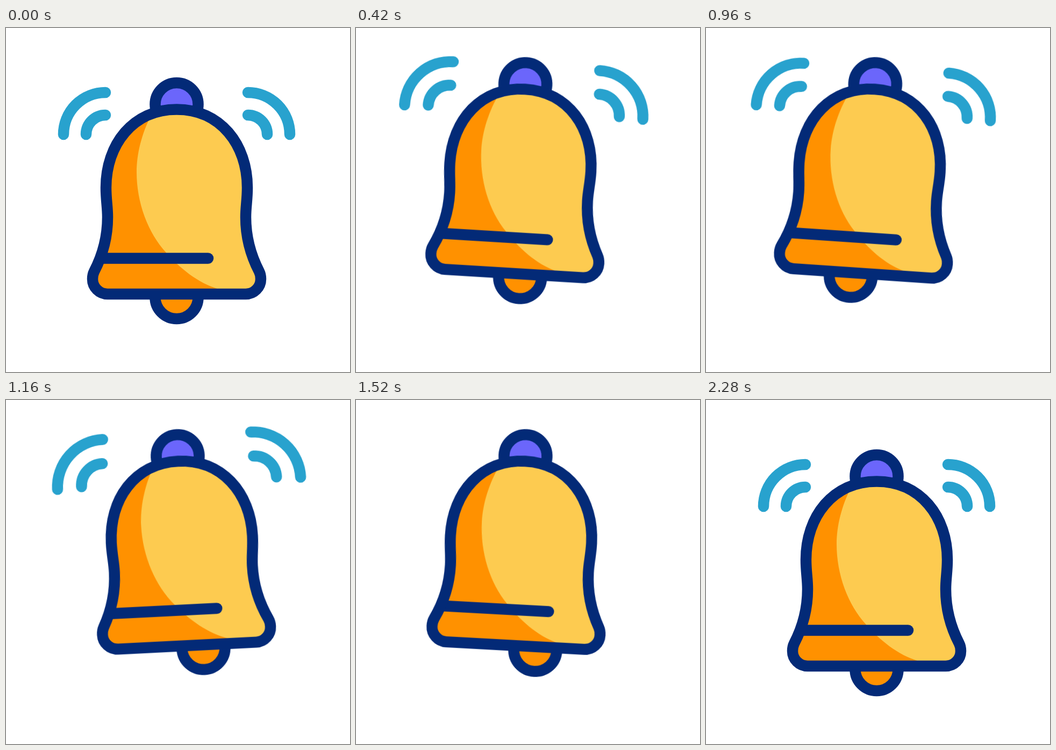
An HTML page for the animation above (2480 ms loop, 640 by 640 pixels).

```html
<!DOCTYPE html>
<html lang="en">
<head>
<meta charset="utf-8">
<title>Ringing bell</title>
<style>
  html, body { margin: 0; width: 100%; height: 100%; overflow: hidden; background: #fff; }
  svg { display: block; width: 100%; height: 100%; }
  .ink { stroke: #032a77; stroke-width: 20.5; stroke-linecap: round; stroke-linejoin: round; }
  .wave { fill: none; stroke: #28a2ce; stroke-width: 20.5; stroke-linecap: round; vector-effect: non-scaling-stroke; }
  #swing { transform-origin: 317.5px 103px; }
  .outer { transform-origin: 146px 159px; }
  .inner { transform-origin: 167px 180px; }
</style>
</head>
<body>
<svg viewBox="0 0 640 640">
  <defs>
    <path id="shell" d="M317.5 151.5 C236 151.5 186 217 186 297 C186 320 189 332 189 352
      C189 390 179 424 164 453 C162 457 161 462 161 467 A28 28 0 0 0 189 495
      H446 A28 28 0 0 0 474 467 C474 462 473 457 471 453
      C456 424 446 390 446 352 C446 332 449 320 449 297 C449 217 399 151.5 317.5 151.5 Z"/>
    <clipPath id="inside"><use href="#shell"/></clipPath>
  </defs>
  <g id="jump">
    <g id="swing">
      <g>
        <path class="wave outer" d="M107 198 A78 78 0 0 1 185 120"/>
        <path class="wave inner" d="M149 198 A36 36 0 0 1 185 162"/>
      </g>
      <g transform="translate(635 0) scale(-1 1)">
        <path class="wave outer" d="M107 198 A78 78 0 0 1 185 120"/>
        <path class="wave inner" d="M149 198 A36 36 0 0 1 185 162"/>
      </g>
      <circle class="ink" cx="317.5" cy="142" r="40" fill="#6b66fb"/>
      <circle id="clapper" class="ink" cx="317.5" cy="501" r="40" fill="#ff9100"/>
      <use href="#shell" fill="#ff9100"/>
      <path clip-path="url(#inside)" fill="#fdcb50" d="M271 160 C252 197 243 235 243 268
        C243 325 264 381 298 418 C324 447 356 474 396 486 L430 500 H480 V140 H271 Z"/>
      <path class="ink" d="M181 428.5 H376"/>
      <use href="#shell" class="ink" fill="none"/>
    </g>
  </g>
</svg>
<script>
  const LOOP = 2480;
  const SINE = 'cubic-bezier(.37,0,.63,1)';

  // Each stop is [time in ms, value, easing towards the next stop].
  function run(selector, prop, stops, format, ease = SINE) {
    const all = [[0, stops[0][1]], ...stops, [LOOP, stops[stops.length - 1][1]]];
    const frames = all.map(([time, value, easing = ease]) =>
      ({ offset: time / LOOP, [prop]: format(value), easing }));
    for (const el of document.querySelectorAll(selector))
      el.animate(frames, { duration: LOOP, iterations: Infinity });
  }

  const moveX = x => `translateX(${x}px)`;
  const moveY = y => `translateY(${y}px)`;
  const turn = a => `rotate(${a}deg)`;
  const spread = ([shift, size]) => `translate(${-shift}px, ${-shift}px) scale(${size})`;

  run('#jump', 'transform', [
    [140, 0], [370, -37.5],
    [1600, -37.5, 'cubic-bezier(.4,0,.75,.72)'],
    [1840, -1, 'cubic-bezier(.35,.24,.6,1)'],
    [2100, 64, 'cubic-bezier(.4,0,.5,1)'],
    [2280, 0]
  ], moveY);

  run('#swing', 'transform', [
    [140, 0], [500, 3.9], [740, -4], [980, 4], [1220, -4], [1460, 4], [1740, -4], [1940, 0]
  ], turn);

  run('#clapper', 'transform', [
    [140, 0], [260, -12], [600, 40], [890, -40], [1110, 40],
    [1330, -40], [1550, 41], [1810, -29], [2060, 0]
  ], moveX);

  // Two outward pulses, then a return to rest from slightly inside.
  const rest = [0, 1], far = [17.5, 1.22];
  run('.wave', 'transform', [
    [140, rest], [775, far], [775, rest], [1410, far], [1410, [-13, 1]], [1700, [-11, 1]], [2280, rest]
  ], spread, 'linear');

  const fade = (selector, lag) => run(selector, 'opacity', [
    [650, 1], [752 + lag, 0], [780 + 2 * lag, 0], [860 + 2 * lag, 1],
    [1310, 1], [1395 + lag, 0], [1700, 0], [1790, 1]
  ], v => v, 'linear');
  fade('.outer', 0);
  fade('.inner', 11);
</script>
</body>
</html>
```
